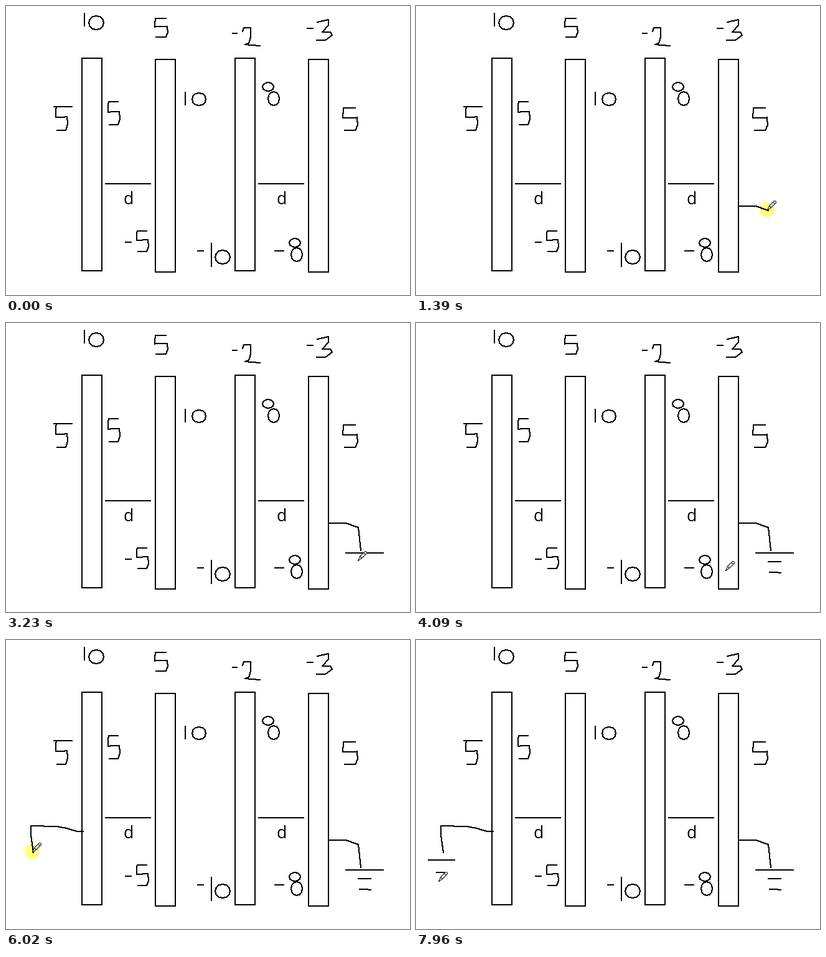
Write an HTML page with a canvas that moves like this. It is 649 px wide and 465 px high and loops after 8000 ms.

```html
<!DOCTYPE html>
<html lang="en">
<head>
<meta charset="utf-8">
<title>Charged plates</title>
<style>
html, body { margin: 0; width: 100%; height: 100%; overflow: hidden; background: #fff; }
canvas { display: block; }
</style>
</head>
<body>
<canvas id="stage" width="649" height="465"></canvas>
<script>
const LOOP = 8000;
const TICK = 77.2;   // ms between recorded pen positions
const LEAD = 19;     // ms the first position comes early
const stage = document.getElementById('stage');
const ctx = stage.getContext('2d');
const board = document.createElement('canvas');
board.width = stage.width;
board.height = stage.height;
const bc = board.getContext('2d');

const mix = (a, b, k) => a + (b - a) * k;
const linear = p => p;
const easeIn = p => p ** 1.8;
const easeOut = p => 1 - (1 - p) ** 1.7;

// Hard-edged two pixel brush
function brush(c, [x0, y0], [x1, y1]) {
  const n = Math.max(1, Math.round(Math.max(Math.abs(x1 - x0), Math.abs(y1 - y0))));
  for (let i = 0; i <= n; i++) {
    c.fillRect(Math.round(mix(x0, x1, i / n)) - 1, Math.round(mix(y0, y1, i / n)) - 1, 2, 2);
  }
}

const ink = (...pts) => pts.slice(1).forEach((p, i) => brush(bc, pts[i], p));
const dash = (x, y, w = 9) => ink([x, y], [x + w, y]);
const one = (x, y, h = 20) => ink([x, y], [x, y + h]);

function zero(x, y, rx, ry) {
  const corners = 12;
  ink(...Array.from({ length: corners + 1 }, (_, i) => {
    const a = i / corners * Math.PI * 2;
    return [x + rx * Math.cos(a), y + ry * Math.sin(a)];
  }));
}

function five(x, y, w, h) {
  const shape = [[0.85, 0], [0.08, 0], [0.04, 0.45], [0.95, 0.43], [1, 0.75], [0.85, 1], [0.15, 1]];
  ink(...shape.map(([u, v]) => [x + u * w, y + v * h]));
}

function eight(x, y, lean) {
  zero(x, y, 9, 7);
  zero(x + lean, y + 19, 9, 11);
}

function drawBoard() {
  bc.fillStyle = '#fff';
  bc.fillRect(0, 0, board.width, board.height);
  bc.fillStyle = bc.strokeStyle = '#000';
  bc.lineWidth = 2;
  for (const x of [122, 368]) {
    bc.strokeRect(x, 84, 32, 342);
    bc.strokeRect(x + 118, 86, 32, 342);
  }
  bc.font = '26.67px "Open Sans", sans-serif';
  for (const x of [160, 406]) {
    dash(x, 286, 72);
    bc.fillText('d', x + 29, 319);
  }

  // Total charges
  one(126, 12);
  zero(145, 27, 12, 11);
  five(238, 20, 22, 30);
  dash(364, 44, 7);
  ink([380, 41], [382, 35], [393, 35], [393, 50], [390, 60], [384, 62], [408, 64]);
  dash(484, 36);
  ink([500, 26], [518, 22], [518, 31], [508, 42], [521, 42], [524, 47], [513, 55], [499, 55]);

  // Face charges
  dash(77, 162, 29);
  five(79, 162, 20, 38);
  five(163, 154, 20, 37);
  one(288, 139);
  zero(310, 150, 11, 10);
  eight(421, 130, 9);
  five(540, 164, 25, 36);
  dash(192, 380);
  five(209, 362, 20, 33);
  dash(308, 394);
  one(330, 382, 37);
  zero(348, 404, 12, 11);
  dash(432, 394, 14);
  eight(464, 381, 3);
}

// Pen strokes run between two ticks; a hover starts where the pen was left
const strokes = [];
let last = [559, 413];

function hover(from, to, pts, ease = linear) {
  strokes.push({ from, to, ease, down: false, pts: [last, ...pts] });
  last = pts.at(-1);
}

function draw(from, to, pts, ease = linear) {
  strokes.push({ from, to, ease, down: true, pts });
  last = tipFor(pts.at(-1));
}

// The cursor sits slightly up and left of the ink it leaves
const tipFor = ([x, y]) => [x - 2, y - 1];

function planStrokes() {
  // Right earth symbol
  hover(2, 5, [[522, 323]]);
  hover(7, 10, [[517, 321]]);
  draw(12, 18, [[519, 322], [546, 322], [566, 329]]);
  draw(19, 23, [[566, 329], [570, 366]]);
  hover(25, 29, [[545, 369]]);
  draw(31, 37, [[546, 370], [606, 370]]);
  hover(38, 42, [[565, 382]]);
  draw(43, 46, [[566, 384], [586, 384]]);
  hover(47, 48, [[567, 400]]);
  draw(49, 51, [[568, 401], [577, 401], [586, 402]]);

  // Left earth symbol
  hover(52, 61, [[498, 398], [117, 307]], easeOut);
  hover(62, 65, [[123, 307]]);
  draw(67, 72, [[124, 308], [114, 308], [98, 303], [82, 300], [40, 299]], easeIn);
  draw(74, 78, [[40, 299], [40, 314], [44, 342]]);
  hover(80, 84, [[19, 352]]);
  draw(85, 89, [[20, 354], [62, 354]]);
  hover(90, 93, [[32, 372]]);
  draw(95, 98, [[33, 374], [45, 374]]);
  hover(99, 103, [[36, 388]], easeIn);
}

// Part of a polyline covered after the given share of its length
function partOf(pts, share) {
  const gap = (a, b) => Math.hypot(b[0] - a[0], b[1] - a[1]);
  const total = pts.slice(1).reduce((sum, p, i) => sum + gap(pts[i], p), 0);
  const part = [pts[0]];
  let left = total * share;
  for (let i = 1; i < pts.length && left > 0; i++) {
    const [a, b] = [pts[i - 1], pts[i]];
    const k = Math.min(1, left / gap(a, b));
    part.push([mix(a[0], b[0], k), mix(a[1], b[1], k)]);
    left -= gap(a, b);
  }
  return part;
}

function drawPencil(x, y) {
  const outline = new Path2D('M.5 .5L3.5-6.5 11.5-14.5H13L14.5-13V-11.5L6.5-3.5ZM3.5-6.5L6.5-3.5M9.5-12.5L12.5-9.5');
  ctx.save();
  ctx.translate(x, y);
  ctx.fillStyle = '#f4f4f4';
  ctx.strokeStyle = '#2a2a2a';
  ctx.lineWidth = 1.1;
  ctx.lineJoin = 'round';
  ctx.fill(outline);
  ctx.stroke(outline);
  ctx.fillStyle = '#222';
  ctx.fillRect(0, -1, 2, 2);
  ctx.restore();
}

function render(ms) {
  const tick = Math.floor((ms + LEAD) / TICK);
  ctx.drawImage(board, 0, 0);
  const begun = strokes.filter(s => s.from <= tick);
  if (!begun.length) return;

  ctx.fillStyle = '#000';
  let tip, down;
  for (const s of begun) {
    const part = partOf(s.pts, s.ease(Math.min(1, (tick - s.from) / (s.to - s.from))));
    down = s.down;
    tip = down ? tipFor(part.at(-1)) : part.at(-1);
    if (down) part.slice(1).forEach((p, i) => brush(ctx, part[i], p));
  }

  const [x, y] = tip.map(Math.round);
  if (down) {
    ctx.globalCompositeOperation = 'multiply';
    ctx.fillStyle = '#ffff80';
    ctx.beginPath();
    ctx.arc(x, y, 12, 0, Math.PI * 2);
    ctx.fill();
    ctx.globalCompositeOperation = 'source-over';
  }
  drawPencil(x, y);
}

function animate() {
  render(performance.now() % LOOP);
  requestAnimationFrame(animate);
}

drawBoard();
planStrokes();
animate();
</script>
</body>
</html>
```
